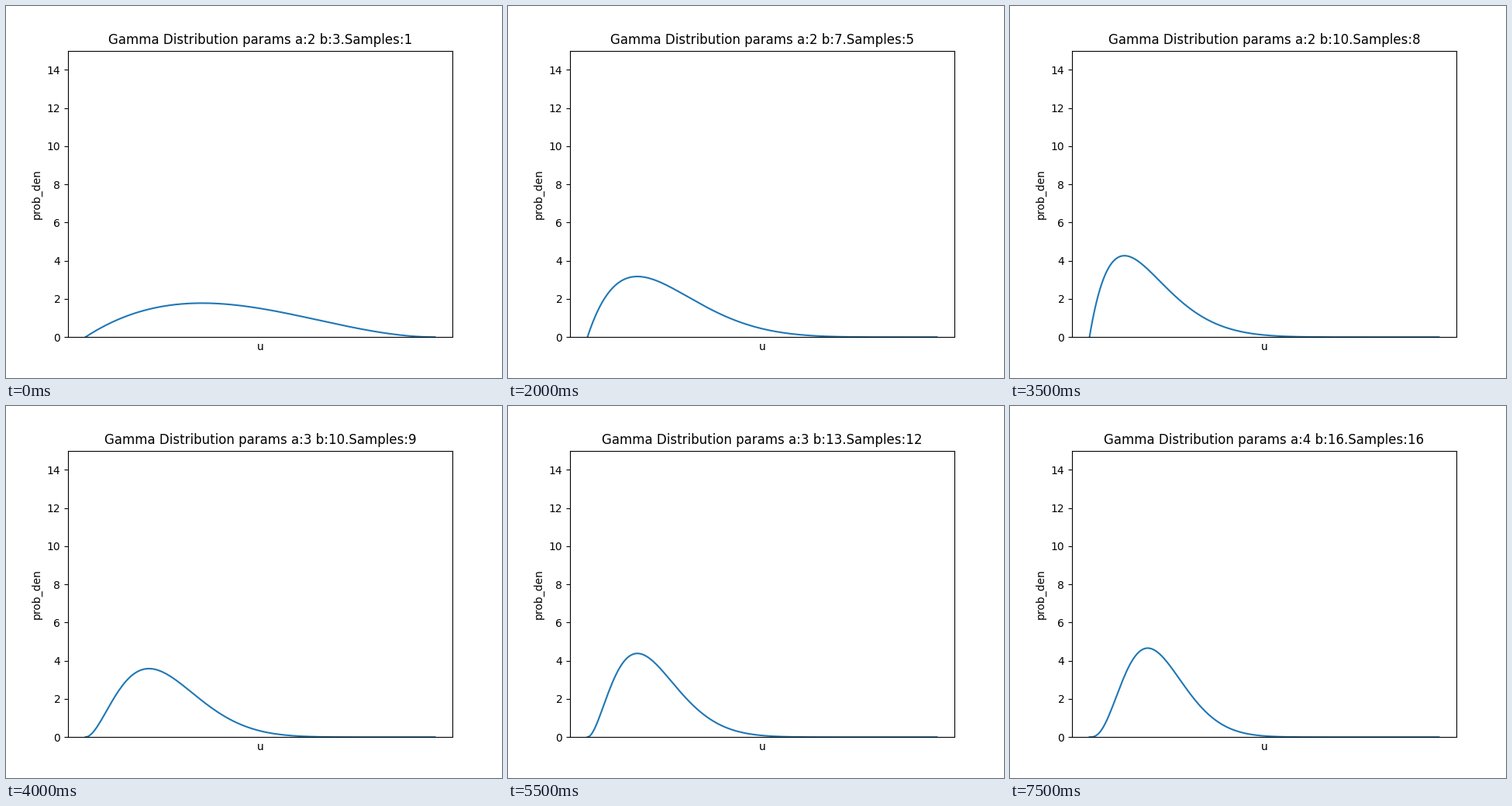
Animation of 640x480 px, one loop 8000 ms. Source, as a matplotlib script:

```python
from math import gamma

import matplotlib.pyplot as plt
import numpy as np
from matplotlib.animation import FuncAnimation

FRAMES = 16
HITS = (9, 14)  # samples that raise a; every other one raises b

fig, ax = plt.subplots(figsize=(6.4, 4.8), dpi=100)
u = np.linspace(0, 1, 200)
line, = ax.plot(u, np.zeros_like(u))
ax.set_ylim(0, 15)
ax.set_xticks([])
ax.set_xlabel("u")
ax.set_ylabel("prob_den")
title = ax.set_title("")


def density(a, b):
    norm = gamma(a + b) / (gamma(a) * gamma(b))
    return norm * u ** (a - 1) * (1 - u) ** (b - 1)


def update(i):
    n = i + 1
    hits = sum(n >= h for h in HITS)
    a, b = 2 + hits, 2 + n - hits
    line.set_ydata(density(a, b))
    title.set_text(f"Gamma Distribution params a:{a} b:{b}.Samples:{n}")
    return line, title


anim = FuncAnimation(fig, update, frames=FRAMES, interval=500, repeat=True,
                     repeat_delay=0, blit=False)
plt.show()
```
